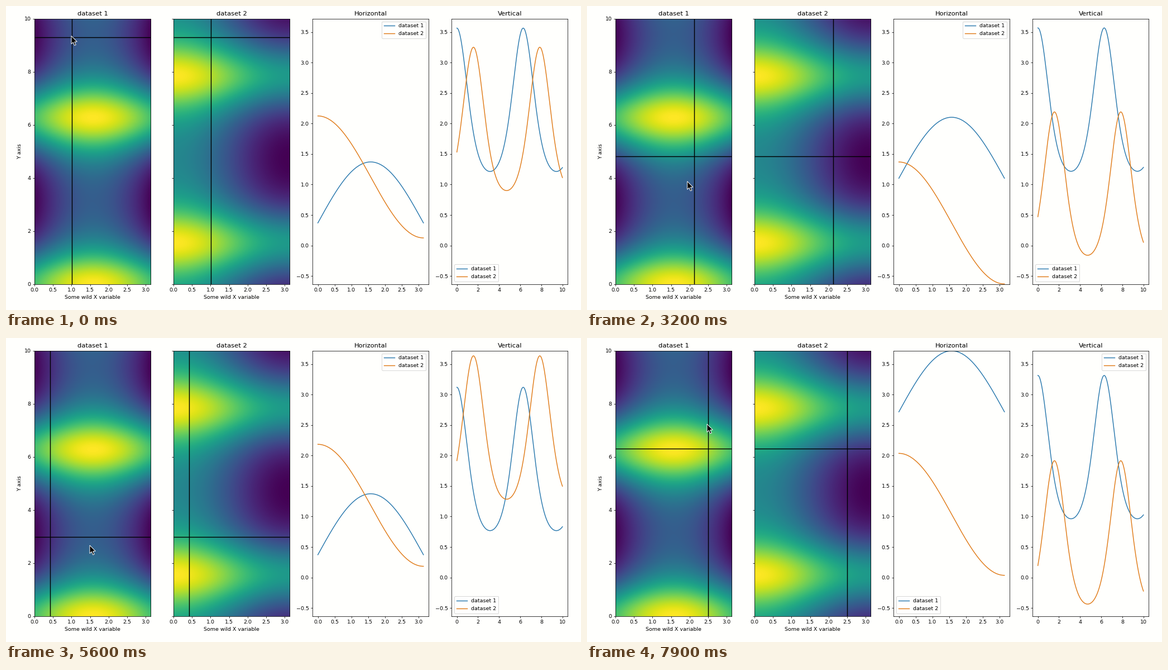
These frames come from a looping animation (1030 by 544 pixels, 8000 ms). A matplotlib script:

```python
import numpy as np
import matplotlib.pyplot as plt
from matplotlib.animation import FuncAnimation
from matplotlib.patches import Polygon

W, H, DPI = 1030, 544, 1030 / 15
STEP, FRAMES = 100, 80
LEFT, PITCH, WIDTH = 51.2, 249, 208
TOP, BOTTOM = 22.8, 497.6
X_MAX, Y_MAX = np.pi, 10
PAPER = "#fffffd"
COLORS = ("#2878ad", "#e07b18")
FIELDS = (lambda x, y: np.sin(x) + np.exp(np.cos(y)),
          lambda x, y: np.cos(x) + np.exp(np.sin(y)))

# Turning points of the pointer: ms, then x and y in pixels
PATH = np.array([
    (700, 117, 53.5), (1100, 155.5, 111.3), (1400, 168, 155),
    (1900, 166, 235), (2100, 166, 202), (2500, 166, 202),
    (2900, 191, 267), (3400, 172, 345), (3700, 170, 365), (4200, 171, 368),
    (4700, 77.5, 354.3), (5300, 77.5, 354.3), (5600, 150, 371),
    (5900, 223.5, 376), (6600, 223, 375), (7600, 216, 195.4),
    (7900, 215, 154),
]).T

# The crosshair trails the pointer and sometimes stalls
LAG = 300
STALLS = ((1400, 1500), (1900, 2300), (2400, 3000), (3700, 3800),
          (3900, 4200), (5000, 5500), (6200, 6300))

ARROW = np.array([(0, 0), (0, 14.5), (3.3, 11.4), (5.7, 17), (8.2, 16),
                  (5.8, 10.6), (10.3, 10.4)])


def pointer_at(t):
    return np.array([np.interp(t, PATH[0], axis) for axis in PATH[1:]])


def crosshair_at(t):
    for start, end in STALLS:
        if start <= t <= end:
            t = start
    px, py = pointer_at(t - LAG) + (1, 2.2)
    return ((px - LEFT) / WIDTH * X_MAX,
            (BOTTOM - py) / (BOTTOM - TOP) * Y_MAX)


# A hair over the size guards against rounding down
fig = plt.figure(figsize=((W + 1e-5) / DPI, (H + 1e-5) / DPI), dpi=DPI,
                 facecolor=PAPER)


def panel(column, title):
    ax = fig.add_axes([(LEFT + column * PITCH) / W, 1 - BOTTOM / H,
                       WIDTH / W, (BOTTOM - TOP) / H], facecolor=PAPER)
    ax.set_title(title)
    return ax


def centers(span, count):
    return (np.arange(count) + 0.5) * span / count


def heat_map(column, field):
    ax = panel(column, f"dataset {column + 1}")
    x, y = centers(X_MAX, 208), centers(Y_MAX, 475)
    ax.imshow(field(x[None, :], y[:, None]), cmap="viridis", origin="lower",
              extent=(0, X_MAX, 0, Y_MAX), aspect="auto",
              interpolation="bilinear")
    ax.set_xticks(np.arange(0, 3.1, 0.5))
    ax.set_yticks(range(0, 11, 2))
    ax.set_xlabel("Some wild X variable")
    return ax, ax.axvline(0, color="k"), ax.axhline(0, color="k")


def profile(column, title, span, ticks):
    ax = panel(column, title)
    lines = [ax.plot([], [], color=color, label=f"dataset {n}")[0]
             for n, color in enumerate(COLORS, 1)]
    ax.set_xlim(-0.05 * span, 1.05 * span)
    ax.set_ylim(np.exp(-1) - 1, np.e + 1)
    ax.set_xticks(ticks)
    ax.set_yticks(np.arange(-0.5, 3.6, 0.5))
    ax.legend(loc="best")
    return lines


maps = [heat_map(i, field) for i, field in enumerate(FIELDS)]
maps[0][0].set_ylabel("Y axis")
maps[1][0].tick_params(labelleft=False)
horizontal = profile(2, "Horizontal", X_MAX, np.arange(0, 3.1, 0.5))
vertical = profile(3, "Vertical", Y_MAX, range(0, 11, 2))

overlay = fig.add_axes([0, 0, 1, 1], zorder=5)
overlay.set(xlim=(0, W), ylim=(H, 0))
overlay.axis("off")
pointer = overlay.add_patch(Polygon(ARROW, fc="black", ec="white", lw=1,
                                    joinstyle="miter"))

xs = np.linspace(0, X_MAX, 200)
ys = np.linspace(0, Y_MAX, 300)


def update(i):
    t = i * STEP
    pointer.set_xy(ARROW + pointer_at(t))
    x, y = crosshair_at(t)
    for _, v_line, h_line in maps:
        v_line.set_xdata([x, x])
        h_line.set_ydata([y, y])
    for field, h_curve, v_curve in zip(FIELDS, horizontal, vertical):
        h_curve.set_data(xs, field(xs, y))
        v_curve.set_data(ys, field(x, ys))
    return []


anim = FuncAnimation(fig, update, frames=FRAMES, interval=STEP, repeat=True,
                     repeat_delay=0, blit=False)
plt.show()
```
